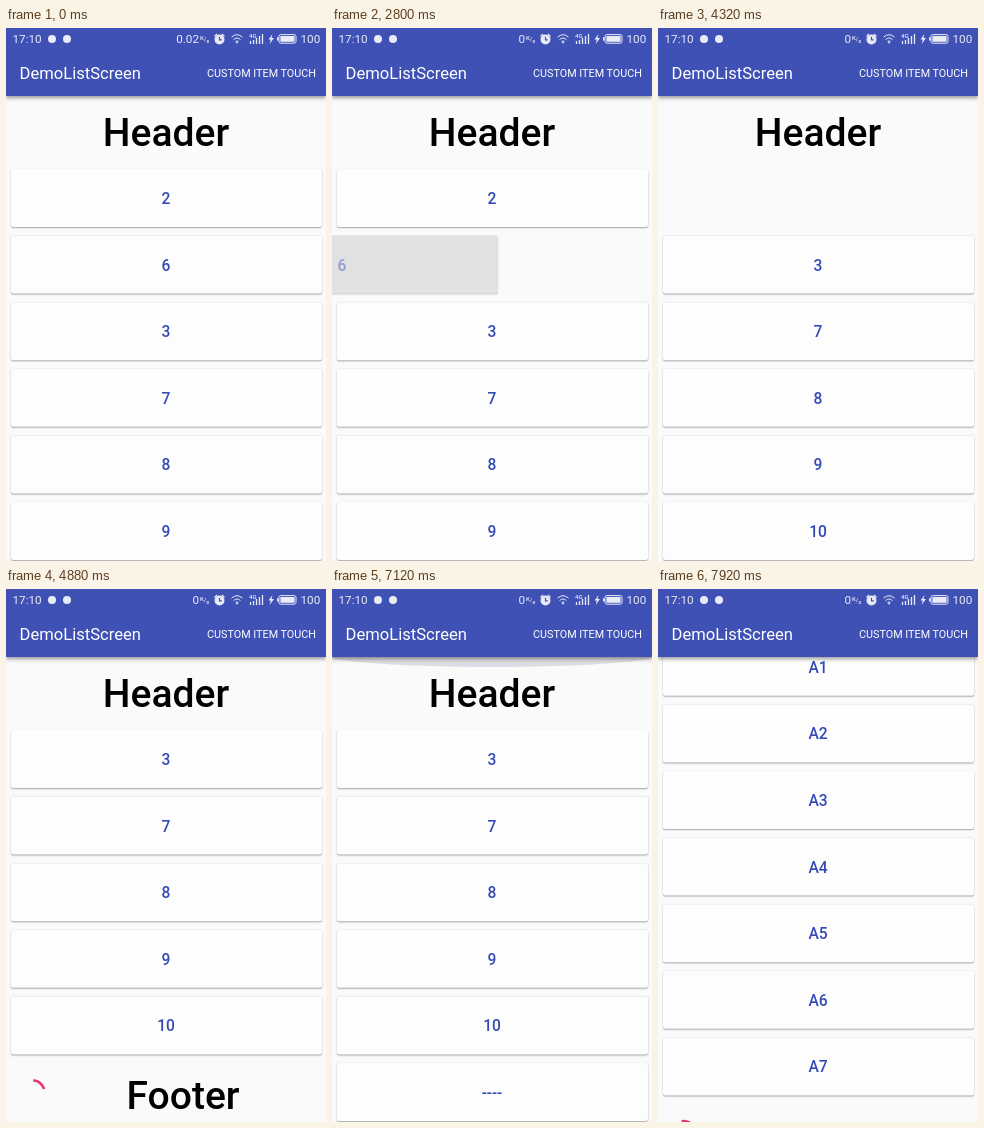
These frames come from a looping animation (320 px wide and 533 px high, 8 s). An HTML page:

```html
<!DOCTYPE html>
<html lang="en">
<head>
<meta charset="utf-8">
<title>List demo</title>
<style>
  html, body { margin: 0; width: 100%; height: 100%; overflow: hidden; background: #fafafa; }
  #stage { position: relative; width: 320px; height: 533px; overflow: hidden; background: #fafafa; font-family: Roboto, sans-serif; }
  #list, .row, #header, #footer, #glow, #bar { position: absolute; left: 0; top: 0; width: 320px; }
  .big { font-weight: 500; font-size: 39px; line-height: 70px; color: #000; text-align: center; white-space: nowrap; }
  #header { top: 69.5px; }
  #footer { height: 70px; }
  #footer span { position: absolute; left: 34px; top: 1.5px; width: 286px; }
  #footer svg { position: absolute; left: 9px; top: 18px; }
  .card { position: absolute; left: 4.5px; top: 4px; width: 311px; height: 58px; border-radius: 2px; background: #fdfdfd;
    box-shadow: 0 1px 1.5px rgba(0,0,0,.32), 0 0 1px rgba(0,0,0,.14);
    font-weight: 500; font-size: 15.6px; line-height: 60px; text-align: center; color: #344ab5; }
  .held { background: #cbcbcb; }
  #glow { left: -20px; top: 48px; width: 360px; height: 30px; border-radius: 50%; background: rgba(70,75,110,.17); transform-origin: 50% 66%; }
  #bar { height: 68px; background: #3f51b5; box-shadow: 0 1.5px 4px rgba(0,0,0,.4); }
  #bar text { fill: #fff; }
  #bar .status { font-size: 11.7px; fill: #e9ebf7; }
  #bar .tiny { font-size: 6px; font-weight: 500; }
</style>
</head>
<body>
<div id="stage">
  <div id="list">
    <div id="header" class="big">Header</div>
    <div id="footer" class="big">
      <svg width="33" height="33"><path id="ring" fill="none" stroke="#ea3274" stroke-width="2.6"/></svg>
      <span>Footer</span>
    </div>
  </div>
  <div id="glow"></div>
  <div id="bar">
    <svg width="320" height="67" font-family="Roboto, sans-serif">
      <text class="status" x="6.5" y="15">17:10</text>
      <g fill="#e9ebf7">
        <circle cx="46" cy="11" r="4"/>
        <circle cx="61" cy="11" r="4"/>
      </g>
      <text id="rate" class="status" x="193" y="15" text-anchor="end">0</text>
      <text class="status tiny" x="194" y="11.5">K<tspan dy="1.5">/</tspan><tspan dy="1.5">s</tspan></text>
      <g fill="none" stroke="#e9ebf7" stroke-width="1.2">
        <circle cx="213.5" cy="11.5" r="4.4" fill="#e9ebf7"/>
        <path d="M208.5 8.5l2.5-2.5M218.5 8.5l-2.5-2.5"/>
        <path d="M213.5 8.8v3h2.3" stroke="#3f51b5"/>
        <path d="M225.5 9.2q5.5-5 11 0M227.5 11.6q3.5-3.2 7 0M229.5 13.6q1.5-1.4 3 0" stroke-width="1"/>
        <path d="M244.5 16v-3M247.5 16v-4M250.5 16v-6M253.5 16v-8M256.5 16v-10" stroke-width="1.3"/>
        <rect x="273" y="6.6" width="17" height="8.6" rx="1.8" stroke-width="1"/>
      </g>
      <g fill="#e9ebf7">
        <circle cx="231" cy="14.6" r=".9"/>
        <path d="M266.5 6l-4 5.5h2.3l-1.2 4.5 4.4-6h-2.500z"/>
        <rect x="274.4" y="8" width="14.2" height="5.8"/>
        <rect x="271" y="9.3" width="1.6" height="3.2"/>
      </g>
      <text class="status tiny" x="243" y="9.5">4G</text>
      <text class="status" x="294.5" y="15">100</text>
      <text x="13.5" y="51" font-size="16.6">DemoListScreen</text>
      <text x="310" y="48.5" font-size="10.8" text-anchor="end">CUSTOM ITEM TOUCH</text>
    </svg>
  </div>
</div>
<script>
const LOOP = 8000, STEP = 80, TOP = 137, PITCH = 66.6;
const LOADED = 6560, FIRST_LOADED = 7;
const labels = ['2', '6', '3', '7', '8', '9', '10', '----', 'A1', 'A2', 'A3', 'A4', 'A5', 'A6', 'A7'];

// [time, value] steps
const scrollKeys = [[4880, 0], [5200, 5.5], [6720, 5.5], [6800, 0], [7280, 0],
  [7440, 90], [7600, 235], [7760, 375], [7920, 491.8], [8000, 525]];
const glowKeys = [[6880, 0], [7120, 1], [7280, 1], [7680, 0]];
const swipes = [
  { row: 1, held: 1920, keys: [[2400, 0], [2800, -150], [3120, -150], [3520, -320]], close: 3629 },
  { row: 0, held: 4000, keys: [[3920, 0], [4320, -320]], close: 4429 }
];

const $ = id => document.getElementById(id);
const clamp = x => Math.min(1, Math.max(0, x));
const ease = x => (1 - Math.cos(Math.PI * clamp(x))) / 2;

function track(keys, t) {
  if (t <= keys[0][0]) return keys[0][1];
  for (let i = 1; i < keys.length; i++) {
    const [t0, a] = keys[i - 1], [t1, b] = keys[i];
    if (t < t1) return a + (b - a) * (t - t0) / (t1 - t0);
  }
  return keys[keys.length - 1][1];
}

const rows = labels.map(label => {
  const row = document.createElement('div');
  row.className = 'row';
  row.innerHTML = `<div class="card">${label}</div>`;
  $('list').append(row);
  return row;
});

const slotOf = (i, t) => swipes.reduce((slot, s) => i > s.row ? slot - ease((t - s.close) / 250) : slot, i);
const place = (el, y, x = 0) => el.style.transform = `translate(${x}px, ${y}px)`;

// The ring stalls while rows load, then starts a new cycle.
function drawRing(t) {
  const p = t < LOADED ? (Math.min(t, 6400) - 5760) / 1333 : (t - 9760) / 1333;
  const turn = Math.floor(p + .5), f = p + .5 - turn, base = 225 + 234 * p;
  const start = base + 270 * (turn + ease(2 * f - 1));
  const end = Math.max(start + 10, base + 270 * (turn + ease(2 * f)));
  const point = deg => {
    const a = deg * Math.PI / 180;
    return `${16.5 + 13.4 * Math.sin(a)} ${16.5 - 13.4 * Math.cos(a)}`;
  };
  $('ring').setAttribute('d', `M${point(start)}A13.4 13.4 0 ${end - start > 180 ? 1 : 0} 1 ${point(end)}`);
}

function render(t) {
  const loaded = t >= LOADED;
  place($('list'), -track(scrollKeys, t));
  rows.forEach((row, i) => {
    const swipe = swipes.find(s => s.row === i);
    const dx = swipe ? track(swipe.keys, t) : 0;
    const fresh = i >= FIRST_LOADED ? clamp((t - LOADED + STEP) / (2 * STEP)) : 1;
    place(row, TOP + PITCH * slotOf(i, t), dx);
    row.style.opacity = fresh * (1 + dx / 320);
    row.style.visibility = i >= FIRST_LOADED && !loaded ? 'hidden' : 'visible';
    if (swipe) row.firstChild.classList.toggle('held', t >= swipe.held);
  });
  place($('footer'), TOP + PITCH * slotOf(loaded ? labels.length : FIRST_LOADED, t));
  drawRing(t);
  const glow = track(glowKeys, t);
  $('glow').style.opacity = glow;
  $('glow').style.transform = `scaleY(${glow})`;
  $('rate').textContent = t < 80 ? '0.02' : '0';
}

function tick() {
  render(Math.floor(performance.now() % LOOP / STEP) * STEP);
  requestAnimationFrame(tick);
}
tick();
</script>
</body>
</html>
```
